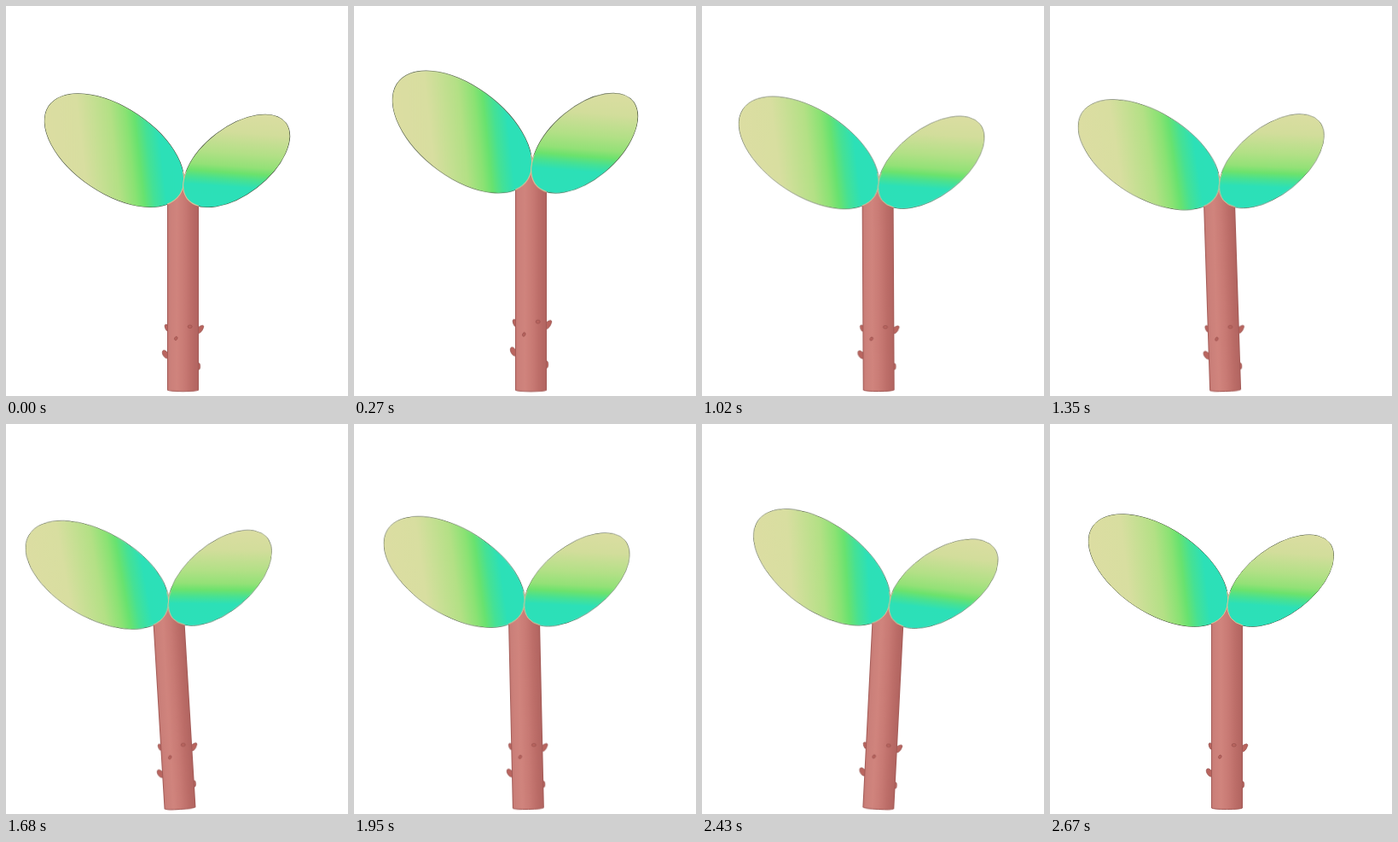
Recreate the animation shown at these times as an HTML page. Size 401 by 457 pixels, loop 2.7 s.

```html
<!DOCTYPE html>
<html lang="en">
<head>
<meta charset="utf-8">
<title>Sprout</title>
<style>
  html, body { margin: 0; width: 100%; height: 100%; overflow: hidden; background: #fff; }
  svg { display: block; width: 401px; height: 457px; }

  /* 90 steps of 30 ms: stretch, settle, lean left, swing right, return */
  #sprout {
    transform-box: view-box;
    transform-origin: 207.5px 451px;
    animation: sway 2700ms -31ms infinite;
  }
  @keyframes sway {
    0% {
      transform: translate(0px, 0px) rotate(0deg) scale(1, 1);
      animation-timing-function: steps(17);
    }
    18.8889% {
      transform: translate(0px, 0px) rotate(0deg) scale(1, 1.146);
      animation-timing-function: steps(16);
    }
    36.6667% {
      transform: translate(0px, 0px) rotate(0deg) scale(1, 1);
      animation-timing-function: steps(28);
    }
    67.7778% {
      transform: translate(-4px, 0px) rotate(-4deg) scale(1, 1);
      animation-timing-function: steps(16);
    }
    85.5556% {
      transform: translate(-1.2px, 0px) rotate(4.75deg) scale(1, 1);
      animation-timing-function: steps(13);
    }
    100% {
      transform: translate(0px, 0px) rotate(0deg) scale(1, 1);
    }
  }
  .edge { fill: none; stroke: #39452f; stroke-width: 1; }
  .seam { fill: none; stroke: #dcc39a; stroke-width: 1; }
  .thorn { fill: #b9655f; stroke: #8f4a47; stroke-width: .6; }
</style>
</head>
<body>
<svg viewBox="0 0 401 457">
  <defs>
    <linearGradient id="leftFill" gradientUnits="userSpaceOnUse" x1="46" y1="178" x2="208" y2="159">
      <stop offset="0" stop-color="#dcdda2"/>
      <stop offset=".27" stop-color="#d8dea0"/>
      <stop offset=".5" stop-color="#b3e085"/>
      <stop offset=".61" stop-color="#8ae273"/>
      <stop offset=".67" stop-color="#68e26f"/>
      <stop offset=".74" stop-color="#45e195"/>
      <stop offset=".83" stop-color="#2ce0b7"/>
      <stop offset="1" stop-color="#2ce0b9"/>
    </linearGradient>
    <linearGradient id="rightFill" gradientUnits="userSpaceOnUse" x1="273" y1="129" x2="265" y2="238">
      <stop offset="0" stop-color="#dadda1"/>
      <stop offset=".2" stop-color="#d2dd9b"/>
      <stop offset=".42" stop-color="#b2e086"/>
      <stop offset=".56" stop-color="#93e177"/>
      <stop offset=".63" stop-color="#6ce26d"/>
      <stop offset=".7" stop-color="#48e192"/>
      <stop offset=".78" stop-color="#2ce0b7"/>
      <stop offset="1" stop-color="#2ce0b9"/>
    </linearGradient>
    <linearGradient id="bark" gradientUnits="userSpaceOnUse" x1="189.5" y1="0" x2="225.5" y2="0">
      <stop offset="0" stop-color="#c67a74"/>
      <stop offset=".1" stop-color="#cb807a"/>
      <stop offset=".3" stop-color="#d0847d"/>
      <stop offset=".55" stop-color="#c87a74"/>
      <stop offset=".8" stop-color="#bb6c67"/>
      <stop offset="1" stop-color="#b16460"/>
    </linearGradient>
    <clipPath id="joint"><rect x="189" y="196" width="37" height="44"/></clipPath>
    <path id="left" d="M50 120.4 A92.4 49.9 33.6 0 1 203.9 222.7 A92.4 49.9 33.6 0 1 50 120.4Z"/>
    <path id="right" d="M212.3 227.6 A72.7 39.7 -37.2 0 1 328.1 139.7 A72.7 39.7 -37.2 0 1 212.3 227.6Z"/>
  </defs>

  <g id="sprout">
    <use href="#left" class="edge"/>
    <use href="#right" class="edge"/>

    <g class="thorn">
      <ellipse cx="188.5" cy="377.5" rx="2" ry="4" transform="rotate(-20 188.5 377.5)"/>
      <ellipse cx="187" cy="408.5" rx="3" ry="5.2" transform="rotate(-32 187 408.5)"/>
      <path d="M224 377 Q226 377 228 375.5 Q231 374 232 376 Q231 381 227 384 L224 383Z"/>
      <ellipse cx="225.5" cy="422.5" rx="2.2" ry="4"/>
    </g>

    <path d="M189.5 205 H225.5 V450 Q223 451.5 207.5 451.5 Q192 451.5 189.5 450Z"
          fill="url(#bark)" stroke="#a35a56" stroke-width="1"/>

    <g class="thorn">
      <ellipse cx="215.7" cy="376.3" rx="2.5" ry="1.8"/>
      <ellipse cx="199.3" cy="390" rx="1.6" ry="2.2" transform="rotate(30 199.3 390)"/>
    </g>

    <use href="#left" fill="url(#leftFill)"/>
    <g clip-path="url(#joint)"><use href="#left" class="seam"/></g>
    <use href="#right" fill="url(#rightFill)"/>
    <g clip-path="url(#joint)"><use href="#right" class="seam"/></g>
  </g>
</svg>
</body>
</html>
```
